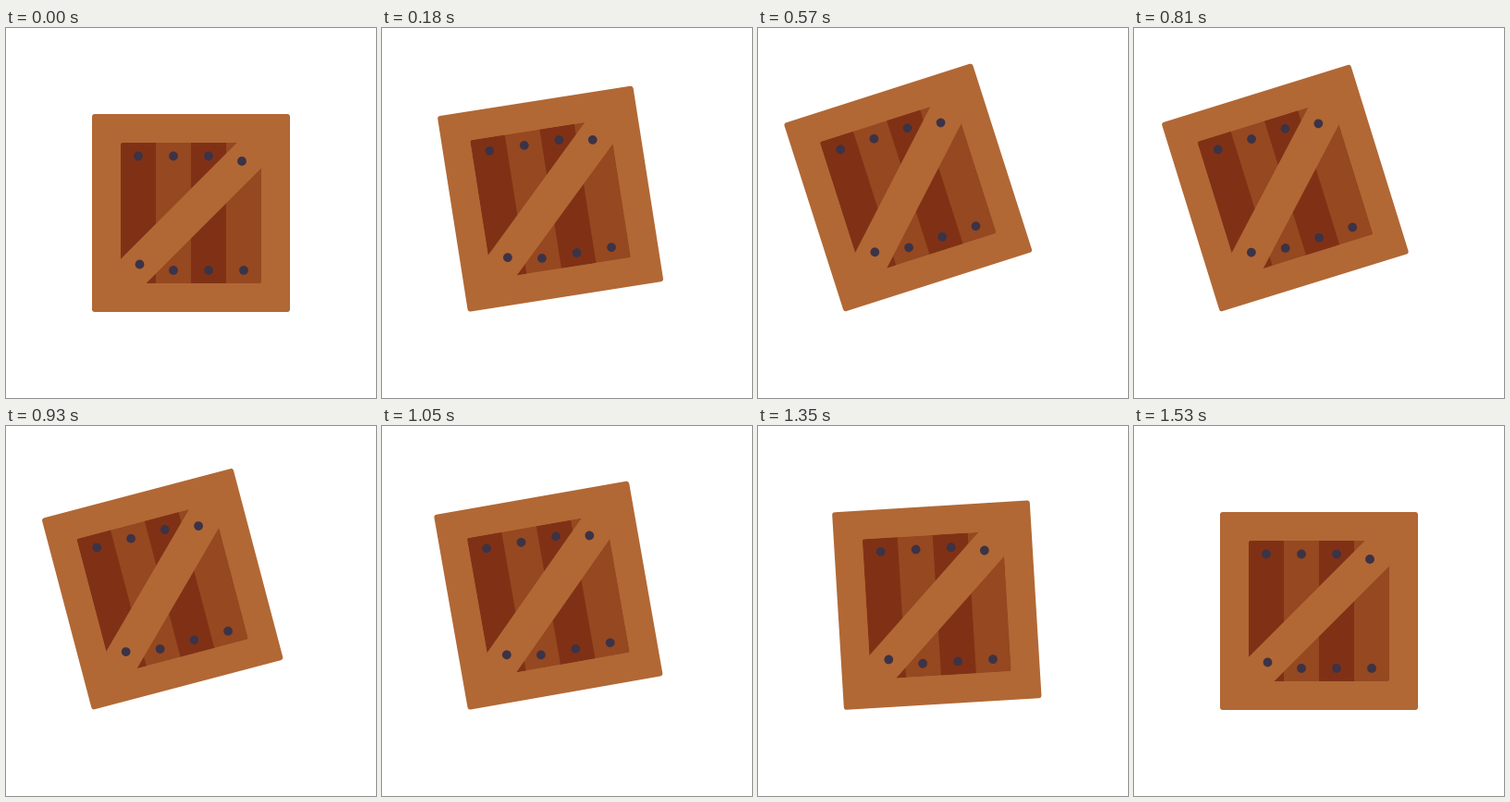
Write an HTML page that moves like this. It is 400x400 px and loops after 3.56 s.

```html
<!DOCTYPE html>
<html lang="en">
<head>
<meta charset="utf-8">
<title>Tipping crate</title>
<style>
  html, body { margin: 0; width: 100%; height: 100%; overflow: hidden; background: #fff; }
  svg { display: block; width: 100%; height: 100%; }
</style>
</head>
<body>
<svg viewBox="0 0 400 400">
  <defs>
    <clipPath id="inside"><rect x="124" y="124" width="152" height="152" rx="2.5"/></clipPath>
  </defs>
  <g id="crate">
    <rect x="93" y="93" width="214" height="214" rx="3" fill="#b16835"/>
    <g clip-path="url(#inside)">
      <rect x="124" y="124" width="152" height="152" fill="#964820"/>
      <path d="M124 124h38v152h-38zM200 124h38v152h-38z" fill="#803115"/>
    </g>
    <path d="M123.5 250.2L250.2 123.5H276.5V151L151 276.5H123.5z" fill="#b16835"/>
    <g fill="#3c3347">
      <circle cx="143" cy="138.5" r="4.9"/>
      <circle cx="181" cy="138.5" r="4.9"/>
      <circle cx="219" cy="138.5" r="4.9"/>
      <circle cx="255" cy="144" r="4.9"/>
      <circle cx="144.5" cy="255.5" r="4.9"/>
      <circle cx="181" cy="262" r="4.9"/>
      <circle cx="219" cy="262" r="4.9"/>
      <circle cx="257" cy="262" r="4.9"/>
    </g>
  </g>
</svg>
<script>
  const LOOP = 3560, STEP = 30;
  const PEAK = 660, LAND = 1200, REST = 1530;
  const TILT = 18, HOP = 3.5;
  const crate = document.getElementById('crate');
  const start = performance.now();

  // Tilt in degrees: tip up, fall back, one small hop, rest.
  function tilt(t) {
    if (t < PEAK) return TILT * (1 - Math.pow(1 - t / PEAK, 2.15));
    if (t < LAND) return TILT * (1 - Math.pow((t - PEAK) / (LAND - PEAK), 2.48));
    if (t < REST) {
      const u = (t - LAND) / (REST - LAND);
      return HOP * 4 * u * (1 - u);
    }
    return 0;
  }

  // The motion advances in 30 ms steps, pivoting on the lower left corner.
  function draw() {
    const t = (performance.now() - start) % LOOP;
    const angle = tilt(Math.floor(t / STEP) * STEP);
    crate.setAttribute('transform', `rotate(${-angle.toFixed(3)} 93 307)`);
    requestAnimationFrame(draw);
  }
  draw();
</script>
</body>
</html>
```
